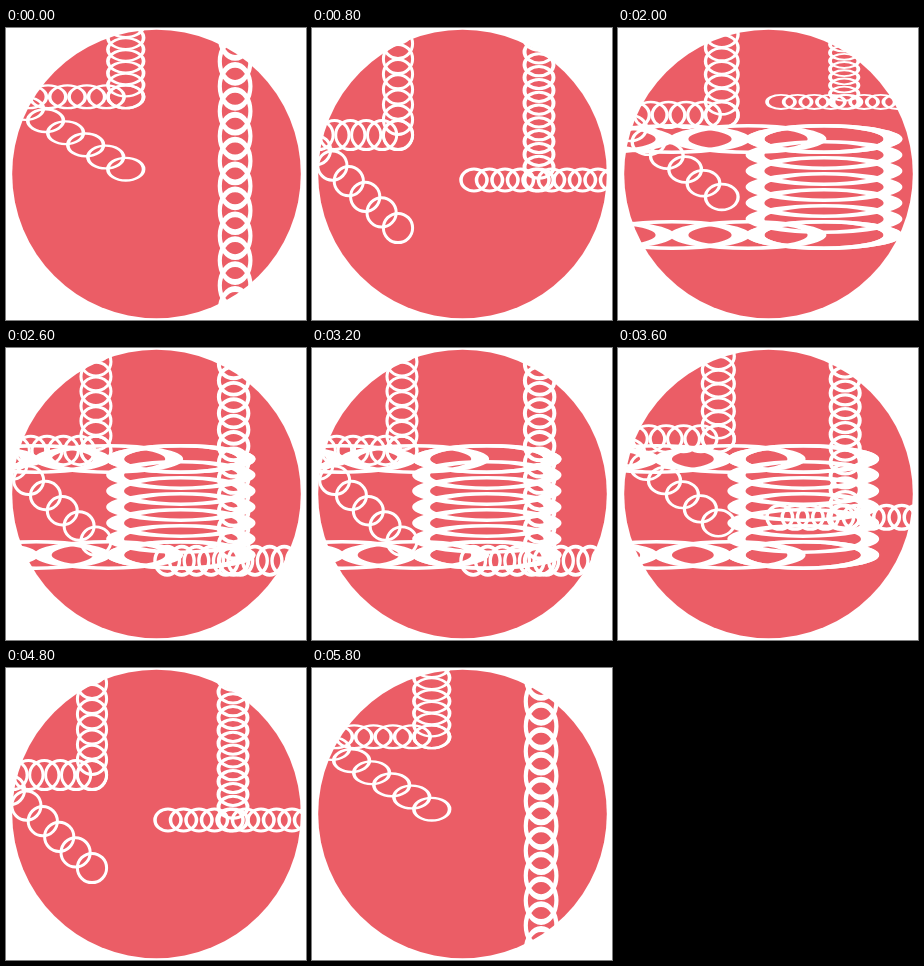
An HTML page with a canvas for the animation above (6 s loop, 300 by 292 pixels).

```html
<!DOCTYPE html>
<html lang="en">
<head>
<meta charset="utf-8">
<title>Springs</title>
<style>
  html, body { margin: 0; width: 100%; height: 100%; overflow: hidden; background: #fff; }
  canvas { display: block; width: 100%; height: 100%; }
</style>
</head>
<body>
<canvas id="stage" width="300" height="292"></canvas>
<script>
const ctx = document.getElementById("stage").getContext("2d");
const TICK = 200, TICKS = 30;

// Eased motion through a few [tick, value] key points.
function glide(tick, keys) {
  const next = keys.findIndex(([at]) => at > tick);
  if (next < 0) return keys[keys.length - 1][1];
  const [t0, v0] = keys[next - 1], [t1, v1] = keys[next];
  const u = (1 - Math.cos(Math.PI * (tick - t0) / (t1 - t0))) / 2;
  return v0 + (v1 - v0) * u;
}

const cornerStretch = tick =>
  glide(tick, [[0, .222], [4, 0], [5, 0], [8, .2], [9, -.167], [10, .117], [13, .026]]);

const teeStretch = tick =>
  glide(tick, [[0, 1.945], [4, 1], [5, 1], [7, 1.52], [9, .664], [10, .64], [12, 1.52], [14, 1.04]]);

// Slides in from the left at a steady pace, then settles back.
const coilStretch = tick =>
  tick <= 10 ? Math.max(0, 1 - .12 * (10 - tick)) : .95 + .05 * Math.exp(10 - tick);

// Scale a drawing, including its line weight, about a fixed point.
function stretched(x, y, sx, sy, draw) {
  ctx.save();
  ctx.translate(x, y);
  ctx.scale(sx, sy);
  ctx.translate(-x, -y);
  draw();
  ctx.restore();
}

function ring(x, y, rx, ry, width) {
  ctx.save();
  ctx.translate(x, y);
  ctx.scale(rx / ry, 1);
  ctx.beginPath();
  ctx.arc(0, 0, ry, 0, Math.PI * 2);
  ctx.lineWidth = width;
  ctx.stroke();
  ctx.restore();
}

function chain(count, x, y, dx, dy, rx, ry, width = 3) {
  for (let i = 0; i < count; i++) ring(x + i * dx, y + i * dy, rx, ry, width);
}

function corner() {
  chain(12, 86, 107, 0, -15.2, 14.6, 14.6);
  chain(10, 86, 107, -15.9, 0, 14.6, 14.6);
  chain(8, 86, 200, -16.4, -15.6, 14.6, 14.6);
}

function tee(stretch) {
  const extra = stretch - 1;
  stretched(190, -65, 1 + .06 * extra, stretch, () => chain(17, 227, 152, 0, -12.8, 14.5, 11));
  stretched(148, -65, 1 - .2 * extra, stretch, () => chain(12, 162, 152, 15.5, 0, 13, 11));
}

function coil() {
  chain(7, 206, 111, 0, 16, 69, 13.2, 3.6);
  for (const y of [111, 207]) chain(6, 206, y, -76, 0, 69, 13.2, 3.6);
}

function draw(time) {
  // The second half of the loop plays the first half backwards.
  const step = Math.floor(time / TICK) % TICKS;
  const tick = Math.min(step, TICKS - 1 - step);
  const lean = cornerStretch(tick);

  ctx.fillStyle = "#fff";
  ctx.fillRect(0, 0, 300, 292);
  ctx.fillStyle = "#eb5d66";
  ctx.beginPath();
  ctx.arc(150.5, 146, 144.3, 0, Math.PI * 2);
  ctx.fill();

  ctx.strokeStyle = "#fff";
  stretched(-66, -65, 1 + lean, 1 - lean, corner);
  tee(teeStretch(tick));
  stretched(-450, 0, coilStretch(tick), 1, coil);
}

const start = performance.now();
function loop() {
  draw(performance.now() - start);
  requestAnimationFrame(loop);
}
loop();
</script>
</body>
</html>
```
